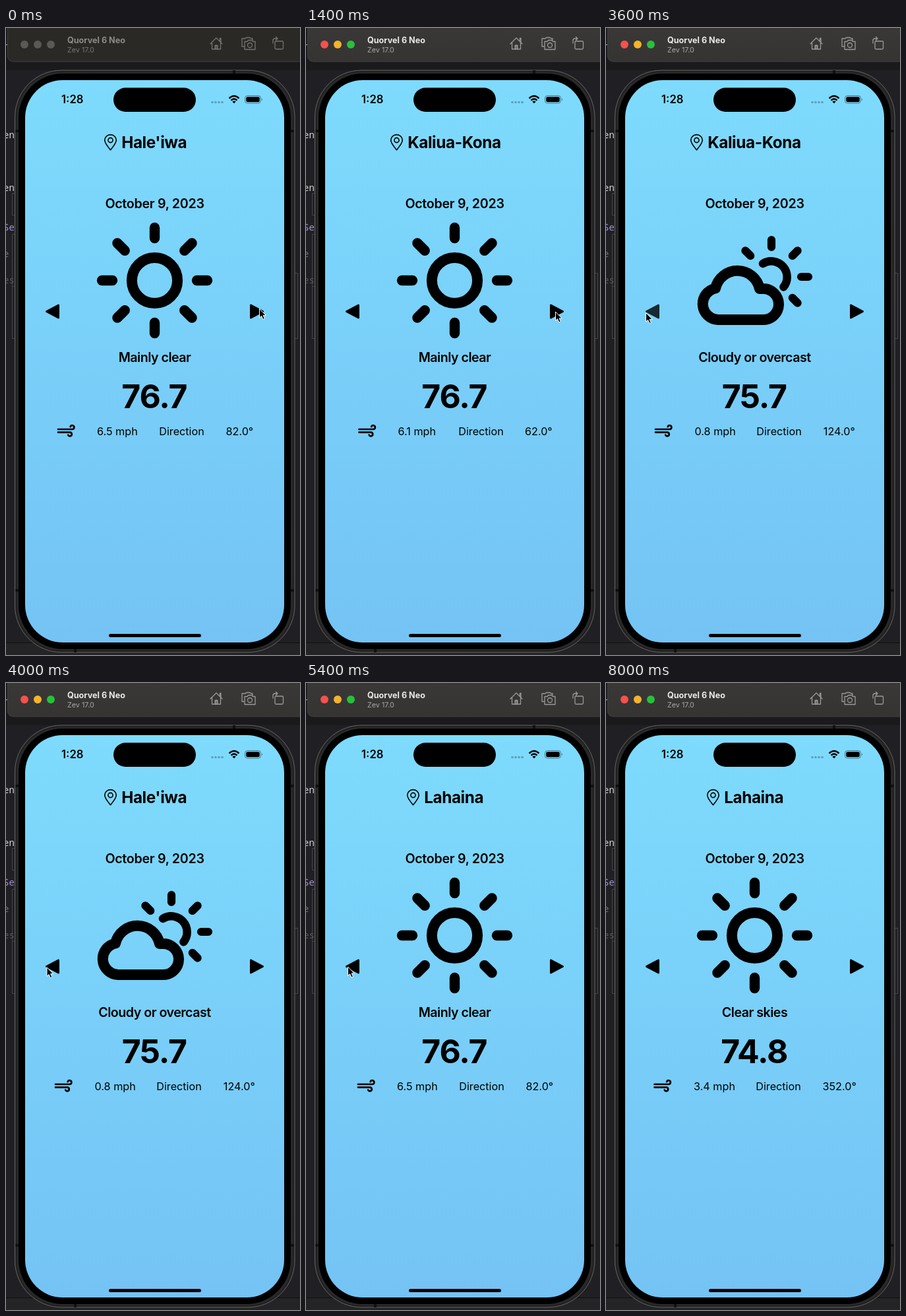
These frames come from a looping animation (446x950 px, 8200 ms). An HTML page:

```html
<!DOCTYPE html>
<html lang="en">
<head>
<meta charset="utf-8">
<title>Weather app</title>
<style>
html, body { margin: 0; width: 100%; height: 100%; overflow: hidden; background: #202024; }
svg { display: block; width: 446px; height: 950px; font-family: Inter, "Open Sans", sans-serif; }
.mid { text-anchor: middle; }
.line { fill: none; stroke: #000; stroke-linecap: round; stroke-linejoin: round; }
.code { font: 14px "Noto Sans Mono", "DejaVu Sans Mono", monospace; }
.label { font-size: 19.7px; font-weight: 600; letter-spacing: -.027em; }
.date { letter-spacing: -.016em; }
.wind { font-size: 16.2px; }
#city { font-size: 24.3px; font-weight: 700; letter-spacing: -.017em; }
#temp { font-size: 49.8px; font-weight: 700; letter-spacing: -.022em; }
#tools { fill: none; stroke: #9a9998; stroke-width: 1.3; stroke-linejoin: round; stroke-linecap: round; }
.idle #bar { fill: #2a2926; }
.idle #lights circle { fill: #5b5956; }
.idle #device { fill: #8d8b89; }
.idle #system { fill: #777573; }
.idle #tools { stroke: #757371; }
</style>
</head>
<body>
<svg id="stage" viewBox="0 0 446 950">
  <defs>
    <linearGradient id="sky" x2="0" y2="1">
      <stop stop-color="#7edbfd"/><stop offset="1" stop-color="#74c3f4"/>
    </linearGradient>
    <linearGradient id="chrome" x2="0" y2="1">
      <stop stop-color="#393837"/><stop offset="1" stop-color="#353433"/>
    </linearGradient>
  </defs>

  <!-- desktop behind the simulator -->
  <rect width="446" height="950" fill="#202024"/>
  <rect width="446" height="64" fill="#1a1a1d"/>
  <path d="M0 931.5H446" stroke="#101012"/>
  <rect y="932" width="446" height="18" fill="#242427"/>
  <path d="M14 250.5H9.5V283.5H14M14 312.5H9.5V470.5H14M9.5 391.5H14M436 371.5H442.5V470.5H436" fill="none" stroke="#46464a"/>
  <g class="code">
    <text x="-4" y="167" fill="#d4d4d8">en</text>
    <text x="-4" y="247" fill="#d4d4d8">en</text>
    <text x="-4" y="307" fill="#a590cf">Se</text>
    <text x="-4" y="347" fill="#707075">e</text>
    <text x="-4" y="387" fill="#57575c">es</text>
    <text x="-5" y="26" fill="#aaa">i</text>
  </g>

  <!-- window bar -->
  <path id="bar" d="M2 0H446V51H12Q2 51 2 41Z" fill="url(#chrome)"/>
  <path d="M2.5 0V41Q2.5 51 12 51H446" fill="none" stroke="#454443" stroke-width=".8"/>
  <g id="lights">
    <circle cx="28" cy="25" r="6" fill="#f6514c"/>
    <circle cx="48" cy="25" r="6" fill="#f4b32c"/>
    <circle cx="68" cy="25" r="6" fill="#28c03c"/>
  </g>
  <text id="device" x="93" y="23" font-size="12.6" font-weight="700" fill="#ebe9e7">Quorvel 6 Neo</text>
  <text id="system" x="93" y="37" font-size="10.8" fill="#aaa8a6">Zev 17.0</text>
  <g id="tools">
    <path d="M310 24L319 15L328 24M312.5 22V32H325.5V22M324.5 19V15.5H326V21"/>
    <path d="M317.5 32V26.5H320.5V32" stroke-width="2"/>
    <path d="M361 28H358V16H363L364.5 14.5H370L372 16H374V18"/>
    <path d="M362 20.5H366L367.5 18.5H373L374.5 20.5H378V32.5H362Z"/>
    <circle cx="370" cy="26" r="3.5"/>
    <rect x="408" y="20" width="12.5" height="12" rx="1.5"/>
    <path d="M405 23V19Q405 16 408 16H412M409.5 13.5L412 16L409.5 18.5"/>
  </g>

  <!-- phone body -->
  <rect x="13.5" y="64" width="424.5" height="882" rx="71" fill="#29292a" stroke="#626263"/>
  <rect x="15.5" y="66" width="420.5" height="878" rx="69" fill="none" stroke="#1b1b1c"/>
  <path d="M346 64V69M105 941V946M14 156H19M432 156H437M14 852H19M432 852H437" stroke="#111" stroke-width="4"/>
  <rect x="19" y="69" width="413" height="872" rx="67"/>
  <rect x="29" y="79" width="393" height="852" rx="57" fill="url(#sky)"/>
  <rect x="163" y="90.5" width="125" height="36.5" rx="18.25"/>
  <rect x="156" y="918" width="140" height="5" rx="2.5"/>

  <!-- status -->
  <text class="mid" x="100.8" y="114" font-size="16.7" font-weight="600">1:28</text>
  <g fill-opacity=".27">
    <circle cx="313" cy="112.5" r="1.8"/><circle cx="318" cy="112.5" r="1.8"/>
    <circle cx="323" cy="112.5" r="1.8"/><circle cx="328" cy="112.5" r="1.8"/>
  </g>
  <path fill="none" stroke="#000" stroke-width="2.4" d="M338.5 106.5Q346 99.5 353.5 106.5M341.5 109.7Q346 105.5 350.5 109.7"/>
  <path d="M343.3 111.5Q346 109.3 348.7 111.5L346 114.3Z"/>
  <rect x="362.5" y="102.5" width="24" height="11.5" rx="3.8" fill="none" stroke="#000" stroke-opacity=".45"/>
  <rect x="364.2" y="104.2" width="20.6" height="8.1" rx="2.4"/>
  <path d="M388 106.5Q390 108.2 388 110Z" fill-opacity=".5"/>

  <!-- weather -->
  <g id="pin" class="line" stroke-width="1.6">
    <path d="M0 184.8C-3 181-8.8 174.5-8.8 170A8.8 8.4 0 0 1 8.8 170C8.8 174.5 3 181 0 184.8Z"/>
    <circle cy="170" r="3.6"/>
  </g>
  <text id="city" y="182"></text>
  <text class="label date mid" x="225.5" y="273">October 9, 2023</text>
  <g id="sun" class="line">
    <circle cx="225.5" cy="382.5" r="34.6" stroke-width="16"/>
  </g>
  <g id="cloud" class="line">
    <path stroke-width="16" d="M170 442H238.5A23.5 23.5 0 0 0 238.5 395H233A34.3 34.3 0 0 0 166 394.5A24 24 0 0 0 170 442Z"/>
    <path stroke-width="12.5" d="M238 357A24 24 0 0 1 269.4 392.4"/>
  </g>
  <g class="line" style="fill:#000" stroke-width="3">
    <path id="prev" d="M61.5 429.5L79.5 420V439Z"/>
    <path d="M389.5 429.5L371.5 420V439Z"/>
  </g>
  <text id="sky-text" class="label mid" x="225.5" y="506"></text>
  <text id="temp" class="mid" x="224.8" y="575.7"></text>
  <path id="gust" class="line" stroke-width="2.7" d="M1.5 608H23A2.9 2.9 0 1 0 20.2 604.2M1.5 612.6H19.5A2.9 2.9 0 1 1 16.7 616.6"/>
  <text id="speed" class="wind" y="617"></text>
  <text id="dir" class="wind" y="617">Direction</text>
  <text id="deg" class="wind" y="617"></text>
  <path id="cursor" d="M0 0V13.6L3.1 10.8L5.4 16L7.9 14.9L5.6 9.9H9.8Z" stroke="#fff" stroke-linejoin="round"/>
</svg>
<script>
const LOOP = 8200, STEP = 200;
const $ = id => document.getElementById(id);

// pin x, text x
const cities = {
  "Hale'iwa": [158.5, 175.2],
  "Kaliua-Kona": [137.5, 154.2],
  "Lahaina": [162.5, 179.2]
};
// x holds the wind row: icon, speed, label, angle
const reports = {
  north: { sky: "Mainly clear", temp: "76.7", speed: "6.5 mph", deg: "82.0°", x: [77.5, 138, 232.2, 333.5] },
  coast: { sky: "Mainly clear", temp: "76.7", speed: "6.1 mph", deg: "62.0°", x: [79, 139.5, 231.2, 332] },
  kona: { sky: "Cloudy or overcast", temp: "75.7", speed: "0.8 mph", deg: "124.0°", x: [73.5, 134.5, 228.2, 329.8], cloudy: true },
  west: { sky: "Clear skies", temp: "74.8", speed: "3.4 mph", deg: "352.0°", x: [72, 133, 227.2, 328.5] }
};
const cityAt = [[0, "Hale'iwa"], [600, "Kaliua-Kona"], [3800, "Hale'iwa"], [5200, "Lahaina"]];
const reportAt = [[0, "north"], [1000, "coast"], [1800, "kona"], [4200, "north"], [5600, "west"]];
const cursorAt = [[0, 384.5, 425.5], [400, 384.5, 425.5], [800, 378.5, 430], [2600, 378.5, 430],
  [3400, 60.5, 431.5], [3800, 60.5, 431.5], [4200, 63.5, 430], [5800, 63.5, 430],
  [6400, 134.5, 291.5], [7000, 180, 40]];

const current = (table, t) => table.findLast(row => row[0] <= t)[1];

function pointer(t) {
  const i = cursorAt.findIndex(row => row[0] > t);
  if (i < 0) return null;
  const [t0, x0, y0] = cursorAt[i - 1], [t1, x1, y1] = cursorAt[i];
  const p = (t - t0) / (t1 - t0), k = p * p * (3 - 2 * p);
  return [x0 + (x1 - x0) * k, y0 + (y1 - y0) * k];
}

function addRays(group, cx, cy, r0, r1, width, angles) {
  const d = angles.map(a => {
    const c = Math.cos(a * Math.PI / 180), s = Math.sin(a * Math.PI / 180);
    return `M${cx + r0 * c} ${cy + r0 * s}L${cx + r1 * c} ${cy + r1 * s}`;
  }).join("");
  group.insertAdjacentHTML("beforeend", `<path d="${d}" stroke-width="${width}"/>`);
}
addRays($("sun"), 225.5, 382.5, 64, 80, 15.4, [0, 45, 90, 135, 180, 225, 270, 315]);
addRays($("cloud"), 251, 377, 45, 56, 12.2, [-135, -90, -45, 0, 45]);

const move = (id, x, y = 0) => $(id).setAttribute("transform", `translate(${x} ${y})`);
const show = (id, on) => $(id).style.display = on ? "" : "none";

function draw(t) {
  const city = current(cityAt, t), report = reports[current(reportAt, t)];
  $("stage").classList.toggle("idle", t < 200);

  $("city").textContent = city;
  move("pin", cities[city][0]);
  $("city").setAttribute("x", cities[city][1]);

  show("sun", !report.cloudy);
  show("cloud", report.cloudy);
  $("sky-text").textContent = report.sky;
  for (const id of ["temp", "speed", "deg"]) $(id).textContent = report[id];
  ["gust", "speed", "dir", "deg"].forEach((id, i) => move(id, report.x[i]));

  $("prev").style.opacity = t === 3600 ? .8 : 1;
  const at = pointer(t);
  show("cursor", at);
  if (at) move("cursor", ...at);
}

let last = -1;
function tick() {
  const t = Math.floor(performance.now() % LOOP / STEP) * STEP;
  if (t !== last) draw(last = t);
  requestAnimationFrame(tick);
}
tick();
</script>
</body>
</html>
```
